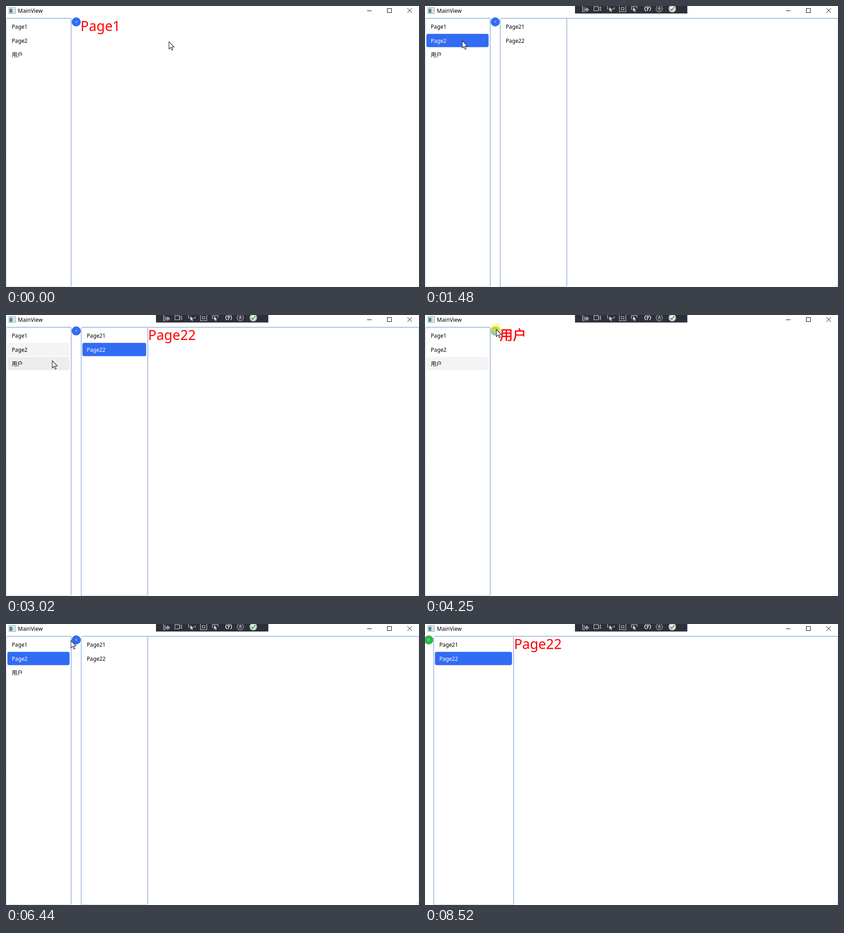
These frames come from a looping animation (906x618 px, 9250 ms). An HTML page with a canvas:

```html
<!DOCTYPE html>
<html lang="en">
<head>
<meta charset="utf-8">
<title>MainView</title>
<style>
html, body { margin: 0; width: 100%; height: 100%; overflow: hidden; background: #fff; }
canvas { display: block; }
</style>
</head>
<body>
<canvas id="stage" width="906" height="618"></canvas>
<script>
const ctx = document.getElementById('stage').getContext('2d');
const W = 906, H = 618, LOOP = 9250;
const PAUSE = 130, HOLD = 120, FLIP = 200;
const ROW = 31, FIRST_ROW = 45, SIDEBAR = 143.5, BUTTON = 10;
const BLUE = '#326cf3', GREEN = '#2db84d', EDGE = '#a9c0df', INK = '#d8d9dc', DARK = '#15152a';
const LATIN = '"Noto Sans", "Open Sans", sans-serif';
const HAN = '"Noto Sans CJK SC", "Noto Sans CJK", sans-serif';
const MAIN = ['Page1', 'Page2', '用户'], SUB = ['Page21', 'Page22'];

const clamp = v => Math.max(0, Math.min(1, v));
const smooth = k => k * k * (3 - 2 * k);
const isHan = label => label > '\u3000';

// The pointer glides to a place; with a target it clicks there after a short pause.
const rowY = i => FIRST_ROW + ROW * i;
const go = (leave, arrive, x, y, target) => ({ leave, arrive, x, y, target, down: arrive + PAUSE });
const moves = [
  go(60, 200, 90, rowY(1)),
  go(400, 510, 72, rowY(1) + 2, 'Page2'),
  go(1430, 1760, 215, rowY(0), 'Page21'),
  go(2060, 2210, 215, rowY(1), 'Page22'),
  go(2800, 3090, 82, rowY(2) - 3, '用户'),
  go(3600, 4070, 156, 31, 'toggle'),
  go(4540, 5010, 12, 34, 'toggle'),
  go(5260, 5340, 15, 36),
  go(5540, 5870, 85, rowY(1) - 6, 'Page2'),
  go(6180, 6440, 142, 36),
  go(6500, 6650, 152, 33, 'toggle'),
  go(6950, 7250, 100, rowY(0), 'Page21'),
  go(7540, 7630, 90, rowY(1) - 5, 'Page22'),
  go(8220, 8500, 265, -22)
];

function pointerAt(t) {
  const p = { x: 357, y: 78 };
  for (const m of moves) {
    const k = smooth(clamp((t - m.leave) / (m.arrive - m.leave)));
    p.x += (m.x - p.x) * k;
    p.y += (m.y - p.y) * k;
  }
  return p;
}

// Replays the clicks made so far.
function stateAt(t) {
  const s = { page: -1, sub: -1, focus: '', closed: false, flippedAt: -FLIP, pressed: false };
  for (const { target, down } of moves) {
    if (!target || t < down) continue;
    s.pressed = t < down + HOLD;
    if (target === 'toggle') {
      s.focus = '';
      if (!s.pressed) {
        s.closed = !s.closed;
        s.flippedAt = down + HOLD;
      }
    } else if (MAIN.includes(target)) {
      Object.assign(s, { page: MAIN.indexOf(target), sub: -1, focus: 'main' });
    } else {
      Object.assign(s, { sub: SUB.indexOf(target), focus: 'sub' });
    }
  }
  return s;
}

function rect(color, x, y, w, h) {
  ctx.fillStyle = color;
  ctx.fillRect(x, y, w, h);
}

function line(points, color = INK, width = 1) {
  ctx.beginPath();
  points.forEach(([x, y]) => ctx.lineTo(x, y));
  ctx.strokeStyle = color;
  ctx.lineWidth = width;
  ctx.stroke();
}

function box(x, y, w, h, color = INK) {
  ctx.strokeStyle = color;
  ctx.lineWidth = 1;
  ctx.strokeRect(x, y, w, h);
}

function ring(x, y, r, color = INK, width = 1, from = 0, to = Math.PI * 2) {
  ctx.beginPath();
  ctx.arc(x, y, r, from, to);
  ctx.strokeStyle = color;
  ctx.lineWidth = width;
  ctx.stroke();
}

function disc(x, y, r, color) {
  ctx.beginPath();
  ctx.arc(x, y, r, 0, Math.PI * 2);
  ctx.fillStyle = color;
  ctx.fill();
}

function rounded(x, y, w, h, r) {
  ctx.beginPath();
  ctx.roundRect(x, y, w, h, r);
}

function text(label, x, y, size, color, align = 'left') {
  ctx.font = `${size}px ${isHan(label) ? HAN : LATIN}`;
  ctx.textAlign = align;
  ctx.fillStyle = color;
  ctx.fillText(label, x, y);
}

function titleBar() {
  rect('#8c989e', 6, 3, 15, 14);
  rect('#eef3f4', 7, 4, 13, 12);
  rect('#3f8f9c', 8, 6, 6, 9);
  rect('#d3dde2', 15, 6, 4, 9);
  text('MainView', 26, 14.5, 12, '#000');
  line([[792, 10.5], [802, 10.5]], '#000');
  box(836.5, 5.5, 9, 9, '#000');
  for (const side of [-5, 5]) line([[885.5 - side, 5], [885.5 + side, 15]], '#000');
  for (let i = 0; i < 3; i++)
    for (let j = 0; j <= i; j++) rect('#c0c0c0', 903 - 3 * j, 612 + 2 * i, 1, 1);
}

function pointerShape(x, y, size) {
  ctx.beginPath();
  [[0, 0], [0, 16], [3.7, 12.6], [6.3, 18.6], [8.7, 17.5], [6.2, 11.7], [11, 11.5]]
    .forEach(([dx, dy]) => ctx.lineTo(x + dx * size, y + dy * size));
  ctx.closePath();
}

function toolbar() {
  rect('#2d303a', 329, 0, 246.5, 16.5);
  // Element list with a crosshair
  line([[351, 12.5], [345.5, 12.5], [345.5, 0]]);
  for (let y = 3.5; y < 10; y += 3) line([[347, y], [351, y]]);
  ring(355, 8, 3);
  line([[350, 8], [360, 8]]);
  line([[355, 3], [355, 13]]);
  // Camera
  box(370.5, 1.5, 10, 9);
  line([[381, 5], [385.5, 2], [385.5, 10], [381, 7]]);
  // Selection arrows around a nested frame
  line([[400.5, 0], [400.5, 7], [403, 7]]);
  line([[410, 6.5], [415.5, 6.5], [415.5, 3]]);
  box(426.5, -0.5, 14, 13);
  box(430.5, 3.5, 6, 5);
  line([[455, 7.5], [452.5, 7.5], [452.5, 1.5], [465.5, 1.5], [465.5, 6]]);
  for (const x of [404.5, 456.5]) {
    pointerShape(x, 2.5, 0.6);
    ctx.fillStyle = INK;
    ctx.fill();
  }
  // Braces around a drop
  ring(487.5, 6, 5.5, '#eee', 1.6, 2, 4.2);
  ring(489.5, 6, 5.5, '#eee', 1.6, -1.1, 1.1);
  ring(488.5, 3.5, 2, '#eee', 1.3);
  line([[489.5, 5], [487, 11]], '#eee', 1.6);
  // Figure
  ring(514, 6, 7);
  disc(514, 2.5, 1.2, INK);
  line([[510, 5], [518, 5]]);
  line([[511.5, 10.5], [514, 5], [516.5, 10.5]]);
  // Check mark
  disc(542.5, 6, 8, '#eef2ec');
  ring(542.5, 6, 6.4, '#69a77d');
  line([[538.5, 6.5], [541.5, 9.5], [546.5, 2.5]], '#39864f', 2);
}

function panel(x, w) {
  rounded(x + 0.5, 27, w - 1, 590.5, 3);
  ctx.fillStyle = '#fff';
  ctx.fill();
  ctx.strokeStyle = '#c4d0de';
  ctx.lineWidth = 1;
  ctx.stroke();
  const right = x + w - 0.5;
  line([[x + 2, 27], [right - 1.5, 27], [right, 29], [right, 616]], EDGE, 2);
  if (x > 0) line([[x + 0.5, 29], [x + 0.5, 616]], EDGE, 1.6);
}

function list(labels, x, w, picked, focused, mouse) {
  panel(x, w);
  const left = x + 3, width = w - 7;
  labels.forEach((label, i) => {
    const top = rowY(i) - 14.7;
    const hover = mouse.x >= left && mouse.x <= left + width && Math.abs(mouse.y - rowY(i)) < ROW / 2;
    const active = picked === i && focused;
    const fill = active ? BLUE : picked === i ? '#f4f4f4' : hover ? '#ededed' : '#fff';
    rounded(left, top, width, 29.3, 4);
    ctx.fillStyle = fill;
    ctx.fill();
    text(label, x + 12.7, rowY(i) + 4.7, isHan(label) ? 12 : 11.8, active ? '#fff' : '#000');
  });
}

function toggleFace(x, scale, color, mark, pressed) {
  if (scale <= 0) return;
  ctx.save();
  ctx.globalAlpha = pressed ? 0.7 : 0.5 + 0.5 * scale ** 3;
  ctx.translate(x, 35);
  ctx.scale(scale, 1);
  disc(0, 0, BUTTON, color);
  text(mark, 0, 3.2, 9, '#fff', 'center');
  ctx.restore();
}

function toggle(x, state, t, mouse) {
  const done = clamp((t - state.flippedAt) / FLIP);
  const green = state.closed ? done : 1 - done;
  const pressed = state.pressed && Math.hypot(mouse.x - x, mouse.y - 35) < BUTTON;
  toggleFace(x, green, GREEN, '>', pressed);
  toggleFace(x, 1 - green, BLUE, '<', pressed);
}

function heading(label, x) {
  if (!isHan(label)) return text(label, x - 1, 55, 30, '#f00');
  text(label, x - 0.8, 55, 29, '#f00');
  ctx.strokeStyle = '#f00';
  ctx.lineWidth = 0.7;
  ctx.strokeText(label, x - 0.8, 55);
}

function cursor({ x, y }) {
  pointerShape(x + 0.5, y + 0.5, 1);
  ctx.fillStyle = '#fff';
  ctx.fill();
  ctx.strokeStyle = DARK;
  ctx.lineWidth = 1.1;
  ctx.stroke();
}

function draw(t) {
  const mouse = pointerAt(t), state = stateAt(t);
  const { page, sub, focus, closed } = state;
  const left = closed ? 18.7 : 164.5;
  const column = (W - left) / 5;

  rect('#fff', 0, 0, W, H);
  titleBar();
  if (!closed) list(MAIN, 0, SIDEBAR, page, focus === 'main', mouse);
  if (page === 1) {
    rounded(left + 0.5, 27, W - left, H, 4);
    ctx.strokeStyle = EDGE;
    ctx.lineWidth = 2;
    ctx.stroke();
    list(SUB, left, column - 1.3, sub, focus === 'sub', mouse);
    if (sub >= 0) heading(SUB[sub], left + column);
  } else {
    heading(MAIN[Math.max(page, 0)], left);
  }
  toggle(left - 10.5, state, t, mouse);
  if (t >= moves[0].leave) toolbar();
  if (state.pressed) disc(mouse.x - 0.5, mouse.y + 0.5, 12, 'rgba(255,255,0,0.55)');
  cursor(mouse);
}

const begin = performance.now();
function tick() {
  draw((performance.now() - begin) % LOOP);
  requestAnimationFrame(tick);
}
tick();
</script>
</body>
</html>
```
